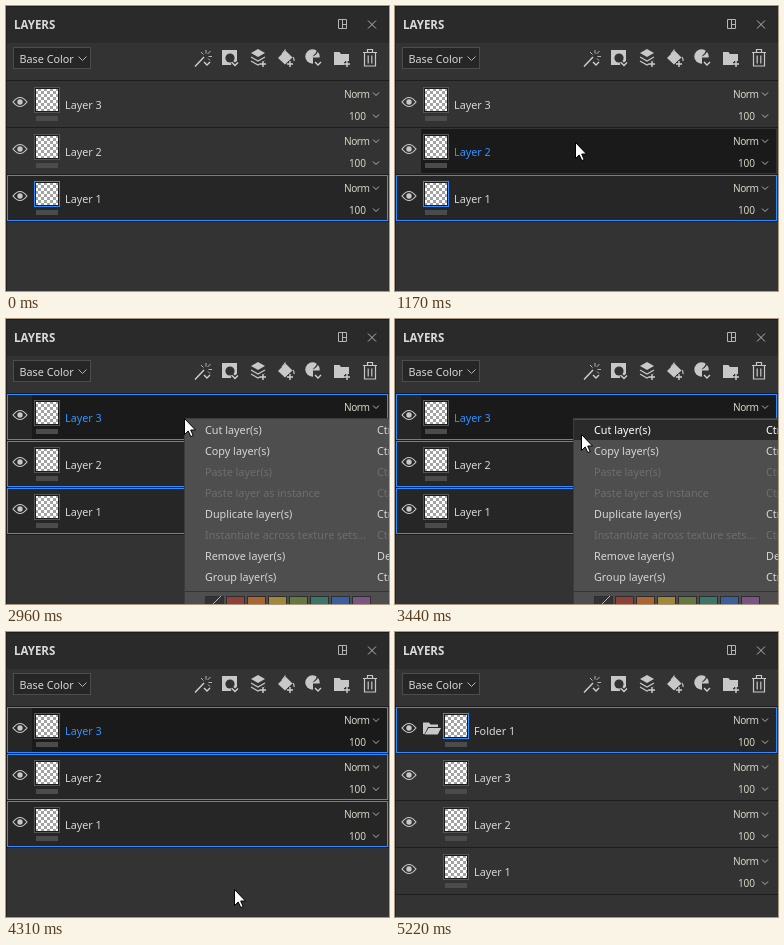
Recreate the animation shown at these times as an HTML page. Size 383 by 285 pixels, loop 6.13 s.

```html
<!DOCTYPE html>
<html lang="en">
<head>
<meta charset="utf-8">
<title>Grouping layers</title>
<style>
  html, body { margin: 0; width: 100%; height: 100%; overflow: hidden; background: #333; }
  svg { display: block; width: 383px; height: 285px; }
  text { font: 10.8px "Noto Sans", "Open Sans", sans-serif; fill: #d6d6d6; white-space: pre; }
  rect { shape-rendering: crispEdges; }
  .title { font-size: 11.5px; font-weight: 600; fill: #dadada; }
  .small { font-size: 10.1px; fill: #d3d4c4; letter-spacing: -.15px; }
  .mode { letter-spacing: -.5px; }
  .line { fill: none; stroke: #c8c8c8; stroke-width: 1.2; }
  .thin { fill: none; stroke: #b4b4b4; stroke-width: 1; }
  .solid { fill: #c8c8c8; }
  .cut { fill: #333; }
  .gap { fill: none; stroke: #333; stroke-width: 4; }
  .badge { fill: none; stroke: #d0d0d0; stroke-width: 1.4; }
  .bg { fill: #333; }
  .hot, .edge, .ring { visibility: hidden; }
  .hot { fill: #1a1a1a; }
  .edge, .ring { fill: none; stroke: #2d8cff; }
  .sel .bg { fill: #262626; }
  .sel .edge, .one .ring, .hover .hot { visibility: visible; }
  .hover .name { fill: #2f92ff; }
  .blank .check { visibility: hidden; }
  .item rect { fill: none; }
  .off text { fill: #6e6e6e; }
  .item.on rect { fill: #2a2a2a; }
  .item.on text { fill: #fff; }
</style>
</head>
<body>
<svg id="stage" viewBox="0 0 383 285"></svg>
<script>
const LOOP = 6130, FOLDER_AT = 4370;
const stage = document.getElementById('stage');

const rect = (x, y, w, h, fill) => `<rect x="${x}" y="${y}" width="${w}" height="${h}" fill="${fill}"/>`;
const text = (x, y, s, cls = '') => `<text x="${x}" y="${y}" class="${cls}">${s}</text>`;
const path = (d, cls = 'line') => `<path d="${d}" class="${cls}"/>`;
const chevron = (x, y) => path(`M${x} ${y}l3 3 3-3`, 'thin');
const badge = d => path(d, 'gap') + path(d, 'badge');
const plus = (x, y) => badge(`M${x - 3} ${y}h6M${x} ${y - 3}v6`);
const arrow = (x, y) => badge(`M${x - 3} ${y - 1.5}l3 3 3-3`);

const eye = path('M7 21Q14 12 21 21Q14 30 7 21Z') +
  '<circle cx="14" cy="21" r="2.7" class="solid"/>';
const folder = path('M28 27V15.5h6l1.5 2H43V20H33L29.5 27Z', 'solid') +
  path('M33.6 21H46l-3.2 6.5H29.8Z', 'solid');

function row(y, name, indent, icon = '') {
  const x = 29 + indent;
  return `<g class="row" transform="translate(0 ${y})">
    <rect class="bg" x="1" width="381" height="46"/>
    <rect class="hot" x="${26 + indent}" y="1" width="${355 - indent}" height="44"/>
    <rect class="edge" x="1.5" y=".5" width="380" height="45"/>
    ${rect(0, 46, 383, 1, '#1d1d1d')}${eye}${icon}
    ${rect(x - 1, 6, 26, 26, '#565656')}${rect(x, 7, 24, 24, '#1c1c1c')}
    <rect class="check" x="${x + 1}" y="8" width="22" height="22" fill="url(#check)"/>
    <rect class="ring" x="${x - .5}" y="6.5" width="25" height="25"/>
    ${rect(x + 1, 35, 22, 5, '#4b4b4b')}
    ${text(x + 30, 28, name, 'name')}
    ${text(338, 17, 'Norm', 'small mode')}${chevron(367, 11.5)}
    ${text(343, 39, '100', 'small')}${chevron(367, 33.5)}
  </g>`;
}

const tools =
  path('M189 60.5L198 51', 'badge') +
  path('M200 44v3.5M204.5 45l-3 3M206 50.5h-3.5M195 46l2.5 2.5M202 52.5l2 2', 'thin') + arrow(201, 57.5) +
  '<rect x="216" y="44" width="15" height="15" rx="1.5" class="solid"/>' +
  '<circle cx="224" cy="52" r="4.6" class="cut"/>' + arrow(229, 58) +
  path('M245 47l7-4 7 4-7 4z', 'solid') +
  path('M245 51l7 4 7-4M245 55l7 4 7-4') + plus(257, 58) +
  path('M272 52l7.5-7.5 7 7-7.5 7z', 'solid') + path('M276 48l3.5-4.5') +
  path('M287 51q1.5 2 1 4') + plus(284, 58) +
  '<circle cx="306.5" cy="50.5" r="7.2" class="solid"/>' +
  path('M307 51.5H315V59H307Z', 'cut') + path('M306.5 50.5q4-1 6-6l-1.2-1q-1 4-4.8 7z', 'cut') +
  arrow(312, 57.5) +
  path('M328 46h5.5l1.5 2h8v11h-15z', 'solid') + plus(341, 58) +
  path('M357 46.5h14M361.5 46v-2.5h5V46M358.5 47v13h11V47M362.2 49.5v8M365.8 49.5v8');

const items = [
  ['Cut layer(s)', 'Ctrl'], ['Copy layer(s)', 'Ctrl'],
  ['Paste layer(s)', 'Ctrl', 'off'], ['Paste layer as instance', 'Ctrl', 'off'],
  ['Duplicate layer(s)', 'Ctrl'], ['Instantiate across texture sets...', 'Ctrl', 'off'],
  ['Remove layer(s)', 'Del'], ['Group layer(s)', 'Ctrl']
];
const swatches = ['#333333', '#8f4038', '#ab652f', '#9e883a', '#647840', '#3a766a', '#38609f', '#7a5484'];

const menu = rect(178, 99, 205, 186, '#3c3c3c') + rect(179, 100, 204, 185, '#4e4e4e') +
  items.map(([label, keys, off = ''], i) => {
    const y = 101 + 21 * i;
    return `<g class="item ${off}"><rect x="179" y="${y}" width="204" height="20"/>
      ${text(199, y + 14, label)}${text(371, y + 14, keys)}</g>`;
  }).join('') +
  rect(179, 272, 204, 1, '#343434') +
  swatches.map((c, i) => rect(199 + 21 * i, 277, 19, 8, '#2e2e2e') +
    rect(200 + 21 * i, 278, 17, 7, c)).join('') +
  path('M207 285l8-8', 'thin');

const names = ['Layer 3', 'Layer 2', 'Layer 1'];
const rowY = i => 75 + 47 * i;

stage.innerHTML = `
  <defs><pattern id="check" x="5" y="7" width="6" height="6" patternUnits="userSpaceOnUse">
    ${rect(0, 0, 6, 6, '#fff')}${rect(3, 0, 3, 3, '#a2a2a2')}${rect(0, 3, 3, 3, '#a2a2a2')}
  </pattern></defs>
  ${rect(0, 0, 383, 285, '#333')}${rect(0, 0, 383, 37, '#2a2a2a')}
  ${rect(0, 0, 383, 1, '#1a1a1a')}${rect(0, 0, 1, 285, '#222')}
  ${text(8, 23, 'LAYERS', 'title')}
  ${path('M332.5 13.5h8v9h-8zM336.5 13.5v9M336.5 18.5h4', 'thin')}
  ${path('M362 14.5l8 8M370 14.5l-8 8', 'thin')}
  <rect x="7.5" y="41.5" width="77" height="21" fill="#262626" stroke="#4c4c4c"/>
  ${text(13.5, 56.5, 'Base Color')}${path('M72.5 50.5l4 4 4-4', 'thin')}
  ${tools}${rect(0, 74, 383, 1, '#1d1d1d')}
  <g id="flat">${names.map((n, i) => row(rowY(i), n, 0)).join('')}</g>
  <g id="grouped">${row(75, 'Folder 1', 20, folder)}
    ${names.map((n, i) => row(rowY(i + 1), n, 20)).join('')}</g>
  <g id="menu">${menu}</g>
  <path id="cursor" d="M.5 .5V16.5L4.2 13 6.8 18.6 9.2 17.5 6.7 12H11.5Z" fill="#fff" stroke="#000"/>`;

// Pointer stops: time, x, y
const stops = [
  [870, 232, 272], [930, 219, 243], [990, 206, 209], [1050, 194, 176], [1110, 186, 152],
  [1170, 180, 136], [1230, 179, 122], [1290, 178, 110], [1350, 178, 102], [1410, 178, 99],
  [3330, 180, 102], [3390, 186, 115], [3450, 195, 139], [3510, 205, 168], [3570, 214, 197],
  [3620, 220, 219], [3680, 224, 235], [3740, 227, 243], [3800, 228, 248], [3850, 228, 251],
  [3890, 228, 253], [3940, 228, 254], [4190, 228, 255], [4250, 228, 256], [4310, 228, 257],
  [4920, 230, 259], [4980, 233, 264], [5040, 238, 270], [5100, 244, 277], [5160, 251, 283]
];

const $ = id => document.getElementById(id);
const flat = $('flat'), grouped = $('grouped'), menuBox = $('menu'), cursor = $('cursor');
const flatRows = [...flat.querySelectorAll('.row')];
const groupRows = [...grouped.querySelectorAll('.row')];
const menuItems = [...menuBox.querySelectorAll('.item')];
const show = (el, on) => { el.style.display = on ? '' : 'none'; };

function draw(t) {
  const shown = t >= 870 && t < 5220;
  const [, x, y] = stops.filter(s => s[0] <= t).pop() || stops[0];
  const isGroup = t >= FOLDER_AT, multi = t >= 1840;
  const menuOpen = t >= 2960 && t < 4060;

  show(cursor, shown);
  cursor.setAttribute('transform', `translate(${x} ${y})`);
  show(flat, !isGroup);
  show(grouped, isGroup);
  show(menuBox, menuOpen);

  const over = !shown ? -1 : multi && !isGroup ? 0 : Math.floor((y - 75) / 47);
  flatRows.forEach((r, i) => {
    r.classList.toggle('sel', multi || i === 2);
    r.classList.toggle('one', !multi && i === 2);
    r.classList.toggle('hover', i === over);
  });
  groupRows.forEach((r, i) => {
    r.classList.toggle('sel', i === 0);
    r.classList.toggle('one', i === 0);
    r.classList.toggle('hover', t >= 4430 && i === over);
    r.classList.toggle('blank', t < 4740);
  });
  const picked = t >= 3330 ? Math.floor((y - 101) / 21) : -1;
  menuItems.forEach((m, i) => m.classList.toggle('on', i === picked && !m.classList.contains('off')));
}

const start = performance.now();
function tick() {
  draw((performance.now() - start) % LOOP);
  requestAnimationFrame(tick);
}
draw(0);
requestAnimationFrame(tick);
</script>
</body>
</html>
```
